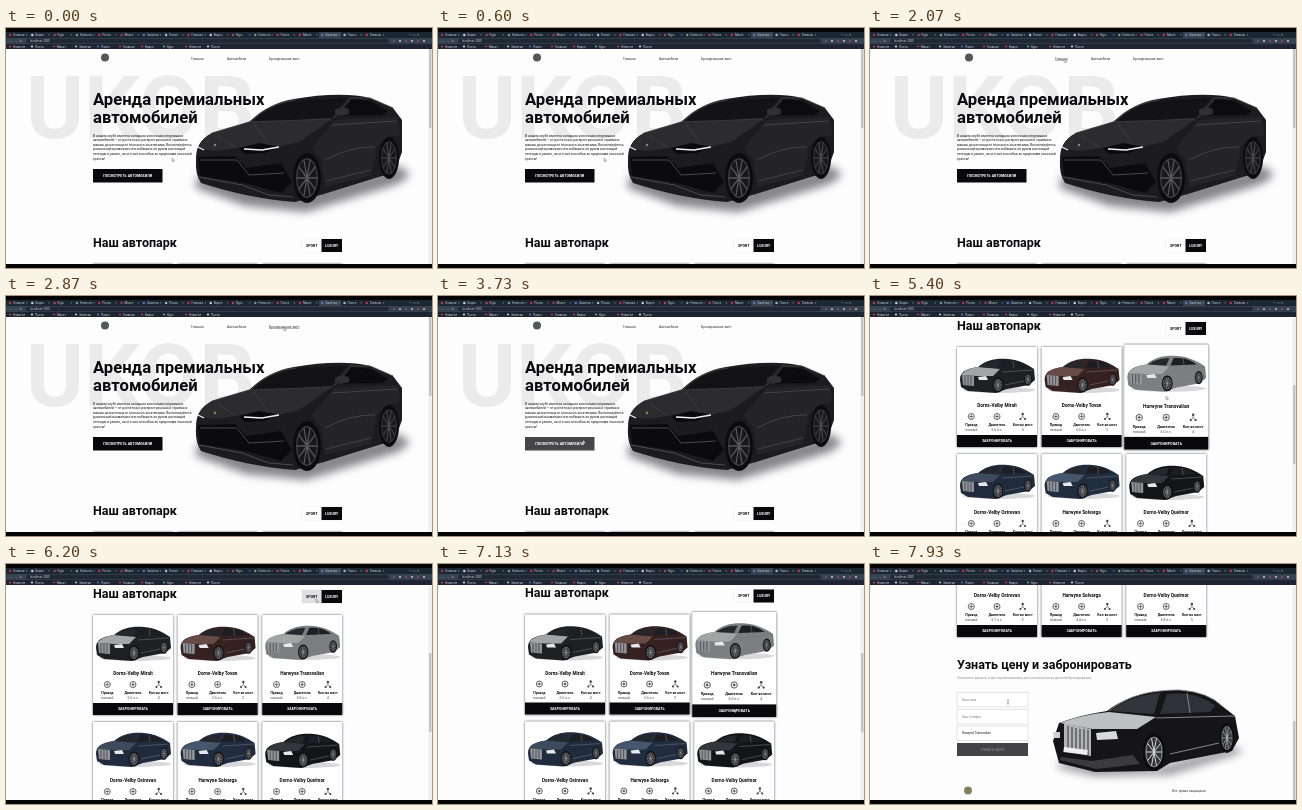
Animation, 426 px wide and 240 px high, one loop 8000 ms. Source, as an HTML page:

```html
<!DOCTYPE html>
<html lang="ru">
<head>
<meta charset="utf-8">
<title>Аренда автомобилей</title>
<style>
  html, body { margin: 0; width: 100%; height: 100%; overflow: hidden; background: #000; }
  svg { display: block; width: 100%; height: 100%; }
  text { font-family: Roboto, "Open Sans", sans-serif; white-space: pre; }
  .card { filter: drop-shadow(.4px .4px .8px #4b4f60); }
  .shadow { filter: blur(4px); }
</style>
</head>
<body>
<svg id="stage" viewBox="0 0 426 240"></svg>
<script>
const LOOP = 8000, TOP = 21, BOTTOM = 236;
const stage = document.getElementById('stage');
const $ = id => document.getElementById(id);

const text = (x, y, str, size, { weight = 400, fill = '#0b0b0d', anchor = 'start', id = '' } = {}) =>
  `<text ${id && `id="${id}"`} x="${x}" y="${y}" font-size="${size}" font-weight="${weight}" fill="${fill}" text-anchor="${anchor}">${str}</text>`;
const rect = (x, y, w, h, fill, extra = '') =>
  `<rect x="${x}" y="${y}" width="${w}" height="${h}" fill="${fill}" ${extra}/>`;
const path = (d, fill, extra = '') => `<path d="${d}" fill="${fill}" ${extra}/>`;
const dot = (x, y, r, fill) => `<circle cx="${x}" cy="${y}" r="${r}" fill="${fill}"/>`;
const line = (d, stroke, width = 1) => path(d, 'none', `stroke="${stroke}" stroke-width="${width}"`);

function wheel(x, y, rx, ry, rim, hub = '#303135') {
  let spokes = '';
  for (let i = 0; i < 10; i++) {
    const a = i * Math.PI / 5;
    spokes += `M${x} ${y}L${x + rx * .72 * Math.cos(a)} ${y + ry * .76 * Math.sin(a)}`;
  }
  return `<ellipse cx="${x}" cy="${y}" rx="${rx}" ry="${ry}" fill="#0c0c0e"/>
    <ellipse cx="${x}" cy="${y}" rx="${rx * .74}" ry="${ry * .78}" fill="${hub}" stroke="${rim}" stroke-width="${rx / 16}"/>
    ${line(spokes, rim, rx / 11)}`;
}

const heroCar = () => `
  ${path('M191 148L292 166L394 138L404 147L392 156L300 184L240 178L190 160Z', '#85858a', 'class="shadow"')}
  ${path('M190 132C190 120 193 112 206 105L243 94C257 81 270 74 288 71C316 66 345 65 364 70L387 80L396 92L396 124L388 146L376 148L318 166L289 174C259 172 222 164 195 155Q189 146 190 132Z', '#1c1c1f')}
  ${path('M192 121Q196 110 206 105L243 94L326 91L293 114L272 119L236 119L211 123Z', '#2c2c30')}
  ${path('M246 93C259 80 274 74 290 72L341 70L326 89L292 92Z', '#131316')}
  ${path('M333 88L346 71L365 73L382 83L376 87Z', '#0c0c0f')}
  ${line('M328 90L344 70L364 70L387 80M246 93C259 80 274 74 290 72', '#46464b', .9)}
  ${line('M212 108L229 119M248 96L262 116M206 105L243 94L326 91', '#434348', .7)}
  ${path('M329 92L392 89L394 107L383 108L371 118L365 148L319 159L315 132L306 119Z', '#242428')}
  ${line('M326 97L391 93M319 132Q345 118 369 119M320 153L365 142', '#4b4b50', .8)}
  ${path('M192 129L229 128L240 140L275 135L286 154L275 165L239 155L194 148Z', '#0b0b0d')}
  ${path('M233 120L253 115L274 119L259 125L239 126Z', '#09090b')}
  ${line('M238 121L256 122L273 119M192 119L198 122', '#f1f1f3', 1.3)}
  ${line('M193 149L236 157L263 167L287 169M194 132L231 132L243 147L278 145', '#58585b', .8)}
  ${dot(209, 117, 1.2, '#8c8755')}
  ${wheel(301, 150, 14, 25, '#55555a', '#18181b')}
  ${wheel(383, 130, 10, 21, '#505054', '#18181b')}
  ${path('M329 82L335 79L343 81L343 86L335 88L329 86Z', '#303034')}`;

const saloon = () => `
  ${path('M189 568L285 574L362 552L374 558L300 581L225 582L188 574Z', '#9a9a9e', 'class="shadow"')}
  ${path('M183 547L189 529Q210 521 237 517C257 502 278 496 310 496Q338 498 352 512L365 522L369 544L362 557L300 569L287 577L225 578L189 569Z', '#151518')}
  ${path('M190 529Q210 521 239 518L286 523L267 535L222 535Z', '#bfc0c4')}
  ${path('M241 517C258 504 274 500 290 499L284 520Z', '#34353a')}
  ${path('M290 520L297 500Q328 497 345 512L340 518Z', '#303238')}
  ${line('M317 499L320 519M239 517C259 501 280 496 310 496Q338 498 352 512M286 524L365 522M300 560L349 549', '#929298', .9)}
  ${path('M194 529L221 535L221 562L194 557Z', '#b4b4b8')}
  ${line('M198 532V557M202 533V558M206 534V559M210 535V560M214 535V561M218 536V561', '#45464a', 1.2)}
  ${path('M226 539L246 537L248 545L227 546Z', '#d9dadd')}
  ${path('M183 538L190 538L190 544L184 544Z', '#cfd0d4')}
  ${path('M191 563L222 567L263 561L270 570L226 575L190 566Z', '#3a3a3f')}
  ${rect(194, 553, 24, 5, '#eeeeef', 'transform="rotate(7 194 553)"')}
  ${wheel(284, 558, 11, 19, '#dadade')}
  ${wheel(357, 544, 7, 15, '#c4c4c8')}`;

const smallCar = ([body, hood, lift]) => `<g transform="translate(0 ${-lift})">
  <ellipse cx="42" cy="43" rx="36" ry="3" fill="#d8d8dc"/>
  ${path('M3 33C3 25 8 22 21 20C29 13 39 11 51 12C62 13 70 17 77 22L78 33L72 38L50 42L39 46L11 44L4 40Z', body)}
  ${path('M4 28Q8 22 21 20L43 22L36 29L20 29Z', hood)}
  ${path('M23 20C30 15 36 14 43 14L40 21Z', '#25272d')}
  ${path('M44 21L47 14C57 13 64 16 69 20Z', '#1c1e23')}
  ${line('M56 14L57 21M45 25L76 23M48 38L67 34', '#777a80', .5)}
  ${path('M5 28L17 29L17 39L6 38Z', '#929499')}
  ${line('M8 29V38M11 29V38M14 29V38', '#38393d', .7)}
  ${path('M21 30L29 29L31 33L22 33Z', '#e7e8ea')}
  ${wheel(41, 38, 5.2, 7.5, '#a4a5a9')}${wheel(71, 32.5, 3.8, 6.3, '#96979b')}</g>`;

const icon = (x, kind) => kind === 2
  ? line(`M${x} 67V69.5L${x - 2.4} 72M${x} 69.5L${x + 2.4} 72`, '#555', .7) + dot(x, 67, 1.2, '#444') + dot(x - 2.3, 72, 1.1, '#444') + dot(x + 2.3, 72, 1.1, '#444')
  : `<circle cx="${x}" cy="69.5" r="3" fill="none" stroke="#555" stroke-width=".9"/>` +
    line(`M${x - 3} 69.5H${x + 3}M${x} 66.5V72.5`, '#777', .5) + dot(x, 69.5, 1.1, '#555');

const cars = [
  ['Dorns-Velby Miralt', '6.6 л.с.', 4, ['#1f2024', '#a4a5a9', 0]],
  ['Dorns-Velby Tovan', '6.6 л.с.', 5, ['#35211f', '#664b46', 0]],
  ['Harwyne Transvalian', '6.0 л.с.', 4, ['#7c7f80', '#a2a5a4', 1]],
  ['Dorns-Velby Ostrevan', '6.7 л.с.', 5, ['#202c3d', '#3e4b5e', 1]],
  ['Harwyne Solvarga', '4.4 л.с.', 5, ['#202d3e', '#46566c', 1]],
  ['Dorns-Velby Quelmor', '6.8 л.с.', 5, ['#141518', '#34363b', 0]],
].map(([name, engine, seats, paint], i) =>
  ({ name, engine, seats, paint, box: [87 + i % 3 * 84.6, 236 + (i > 2) * 107, 80, 100] }));

function card({ name, engine, seats, paint }, i) {
  const mid = { anchor: 'middle' }, bold = { ...mid, weight: 700 };
  const facts = [['Привод', 'полный'], ['Двигатель', engine], ['Кол-во мест', seats]];
  return `<g id="card${i}" class="card">${rect(0, 0, 80, 100, '#fefefe')}${smallCar(paint)}
    ${text(40, 60.3, name, 4.7, bold)}
    ${facts.map(([label, value], k) => {
      const x = 14.3 + k * 25.7;
      return icon(x, k) + text(x, 79.3, label, 3.4, bold) + text(x, 84.2, value, 3.3, { ...mid, fill: '#444' });
    }).join('')}
    ${rect(0, 88, 80, 12, '#09090b')}
    ${text(40, 95.3, 'ЗАБРОНИРОВАТЬ', 3.55, { ...bold, fill: '#fff' })}</g>`;
}

const navItems = [['Главная', 185], ['Автомобили', 221], ['Бронирование авто', 263]];
const intro = ['В нашем клубе имеется солидная коллекция спортивных',
  'автомобилей — от достаточно распространенных серийных',
  'машин до настоящего гоночного эксклюзива. Воспользуйтесь',
  'уникальной возможностью побывать за рулем настоящей',
  'легенды и узнать, на что она способна за пределами гоночной', 'трассы!'];

const field = (y, value, fill) => rect(87, y, 71, 14.5, '#fff', 'stroke="#d3d0da" stroke-width=".6"') +
  text(92, y + 8.3, value, 3.1, { fill });

const page = () => `
  ${text(20, 110, 'UKOB', 88, { weight: 700, fill: '#ebebec' })}
  ${dot(99, 29.5, 4, '#55565a')}
  ${navItems.map(([label, x], i) => text(x, 31.6, label, 3.3, { fill: '#333', id: 'nav' + i })).join('')}
  ${heroCar()}
  ${text(87, 77, 'Аренда премиальных', 16.65, { weight: 700 })}
  ${text(87, 95, 'автомобилей', 16.65, { weight: 700 })}
  ${intro.map((s, i) => text(87, 108.8 + i * 4.55, s, 3.33, { fill: '#111' })).join('')}
  ${rect(87, 141, 69.5, 13.5, '#09090b', 'id="more"')}
  ${text(121.7, 149, 'ПОСМОТРЕТЬ АВТОМОБИЛИ', 3.55, { weight: 700, fill: '#fff', anchor: 'middle' })}
  ${text(87, 218.5, 'Наш автопарк', 12.5, { weight: 700 })}
  ${rect(296, 211, 40, 13, '#fff', 'stroke="#dedee2" stroke-width=".5"')}
  ${rect(296, 211, 19.5, 13, '#fff', 'id="sport"')}
  ${rect(315.5, 211, 20.5, 13, '#09090b')}
  ${text(305.7, 218.7, 'SPORT', 3.55, { weight: 700, anchor: 'middle' })}
  ${text(325.7, 218.7, 'LUXURY', 3.55, { weight: 700, fill: '#fff', anchor: 'middle' })}
  ${cars.map(card).join('')}
  ${text(87, 475, 'Узнать цену и забронировать', 12.5, { weight: 700 })}
  ${text(87, 485, 'Заполните данные, и мы перезвоним вам для уточнения всех деталей бронирования', 3.33, { fill: '#8c8c91' })}
  ${saloon()}
  ${field(498.5, 'Ваше имя', '#808086')}
  ${field(515.5, 'Ваш телефон', '#808086')}
  ${field(532, 'Harwyne Transvalian', '#111')}
  ${rect(87, 549, 71, 13, '#444448')}
  ${text(122.5, 556.7, 'УЗНАТЬ ЦЕНУ', 3.55, { anchor: 'middle', fill: '#98989c' })}
  ${dot(98, 596.5, 4, '#85835f')}
  ${text(336, 597.5, 'Все права защищены', 3.33, { anchor: 'end', fill: '#333' })}`;

function browser() {
  const labels = ['Главная', 'Видео', 'Курс', 'Новости', 'Почта', 'Макет', 'Заметки', 'Поиск'];
  const colors = ['#c93340', '#c93340', '#cc3b46', '#b7bdc8', '#c93340', '#d4d7df', '#537bc4', '#65a77a'];
  let out = rect(0, 0, 426, 21, '#050506') + rect(0, 4, 426, 6, '#1b2732') +
    rect(0, 10, 426, 6, '#364250') + rect(0, 16, 426, 5, '#1d2533') +
    rect(313, 4, 22, 6, '#364250') + rect(20, 10.8, 363, 4.4, '#1f2833', 'rx="2.2"');
  for (let i = 0; i < 17; i++) {
    const x = 3 + i * 22.3;
    out += dot(x + 1, 7, 1.2, colors[i * 5 % 8]) + text(x + 4, 8, labels[i % 8], 3, { fill: '#c6cad1' }) +
      text(x + 17, 8, '×', 3, { fill: '#aab0b9' });
  }
  out += text(3, 14.2, '←  →  ↻', 3.4, { fill: '#c5c8cd' }) + text(24, 14.1, 'localhost:3000', 3, { fill: '#c4c9d1' });
  for (let i = 0; i < 10; i++) {
    const x = 3 + i * 22;
    out += dot(x + 1, 18.5, 1.1, colors[(i * 3 + 2) % 8]) + text(x + 4, 19.5, labels[(i + 3) % 8], 3, { fill: '#cdd1d8' });
  }
  for (let x = 388; x < 422; x += 6) out += dot(x, 13, 1, x % 4 ? '#c5ccd6' : '#a14e5b');
  return out + text(403, 8.2, '—  □  ×', 3.4, { fill: '#ddd' });
}

stage.innerHTML = `<defs><clipPath id="view">${rect(0, TOP, 426, BOTTOM - TOP, '#fff')}</clipPath></defs>
  ${rect(0, 0, 426, 240, '#050506')}
  <g clip-path="url(#view)">${rect(0, TOP, 426, 215, '#fdfdfd')}<g id="page">${page()}</g>
  ${rect(422.5, TOP, 3.5, 215, '#f0f0f1')}${rect(423, TOP, 2.5, 79, '#c4c4c7', 'id="thumb"')}</g>
  ${browser()}
  ${path('M0 0V3.4L.9 2.6L1.6 3.9L2.1 3.6L1.6 2.4H2.6Z', '#fff', 'id="cursor" stroke="#222" stroke-width=".3"')}
  ${line('M-.8 -2H.8M0 -2V2M-.8 2H.8', '#444', .5).replace('<path', '<path id="caret"')}`;

const ease = p => (p = Math.min(1, Math.max(0, p)), p * p * (3 - 2 * p));
const scrollAt = t => 185 * (ease((t - 3900) / 500) + ease((t - 7050) / 550));

// time, x, y
const route = [[0, 166, 130], [1550, 166, 130], [1950, 194, 31], [2250, 194, 31], [2550, 231, 31],
  [2850, 278, 31], [3500, 145, 144], [4250, 145, 144], [4450, 205, 115], [4900, 212, 110],
  [5250, 296, 110], [5600, 296, 85], [6050, 310, 35], [6450, 310, 35], [6800, 296, 145],
  [7300, 296, 145], [7850, 138, 138], [LOOP, 138, 138]];
function cursorAt(t) {
  const i = Math.max(1, route.findIndex(k => k[0] > t));
  const [a, b] = [route[i - 1], route[i]];
  const p = ease((t - a[0]) / (b[0] - a[0]));
  return [a[1] + (b[1] - a[1]) * p, a[2] + (b[2] - a[2]) * p];
}

// Averaging recent hits gives a hover fade that depends only on time.
function hover(t, [x, y, w, h]) {
  let hits = 0;
  for (let k = 0; k < 10; k++) {
    const past = Math.max(0, t - k * 15), [cx, cy] = cursorAt(past), py = cy + scrollAt(past);
    hits += cx >= x && cx <= x + w && py >= y && py <= y + h;
  }
  return hits / 10;
}
const mix = (a, b, p) => { const v = Math.round(a + (b - a) * p); return `rgb(${v},${v},${v + 2})`; };

function draw(t) {
  const scroll = scrollAt(t), [cx, cy] = cursorAt(t);
  $('page').setAttribute('transform', `translate(0 ${-scroll})`);
  $('thumb').setAttribute('y', TOP + scroll * 215 / 585);
  navItems.forEach(([label, x], i) =>
    $('nav' + i).setAttribute('text-decoration', hover(t, [x, 27, label.length * 1.8, 7]) > .5 ? 'underline' : 'none'));
  $('more').setAttribute('fill', mix(9, 70, hover(t, [87, 141, 69.5, 13.5])));
  $('sport').setAttribute('fill', mix(253, 224, hover(t, [296, 211, 19.5, 13])));
  cars.forEach(({ box }, i) => {
    const s = 1 + .05 * hover(t, box);
    $('card' + i).setAttribute('transform', `translate(${box[0] + 40} ${box[1] + 50}) scale(${s}) translate(-40 -50)`);
  });
  const typing = t > 7800;
  $(typing ? 'caret' : 'cursor').setAttribute('transform', `translate(${cx} ${cy})`);
  $('caret').setAttribute('visibility', typing ? 'visible' : 'hidden');
  $('cursor').setAttribute('visibility', typing ? 'hidden' : 'visible');
}

const start = performance.now();
function tick() {
  const t = (performance.now() - start) % LOOP;
  draw(Math.floor(t * .015) / .015);
  requestAnimationFrame(tick);
}
tick();
</script>
</body>
</html>
```
